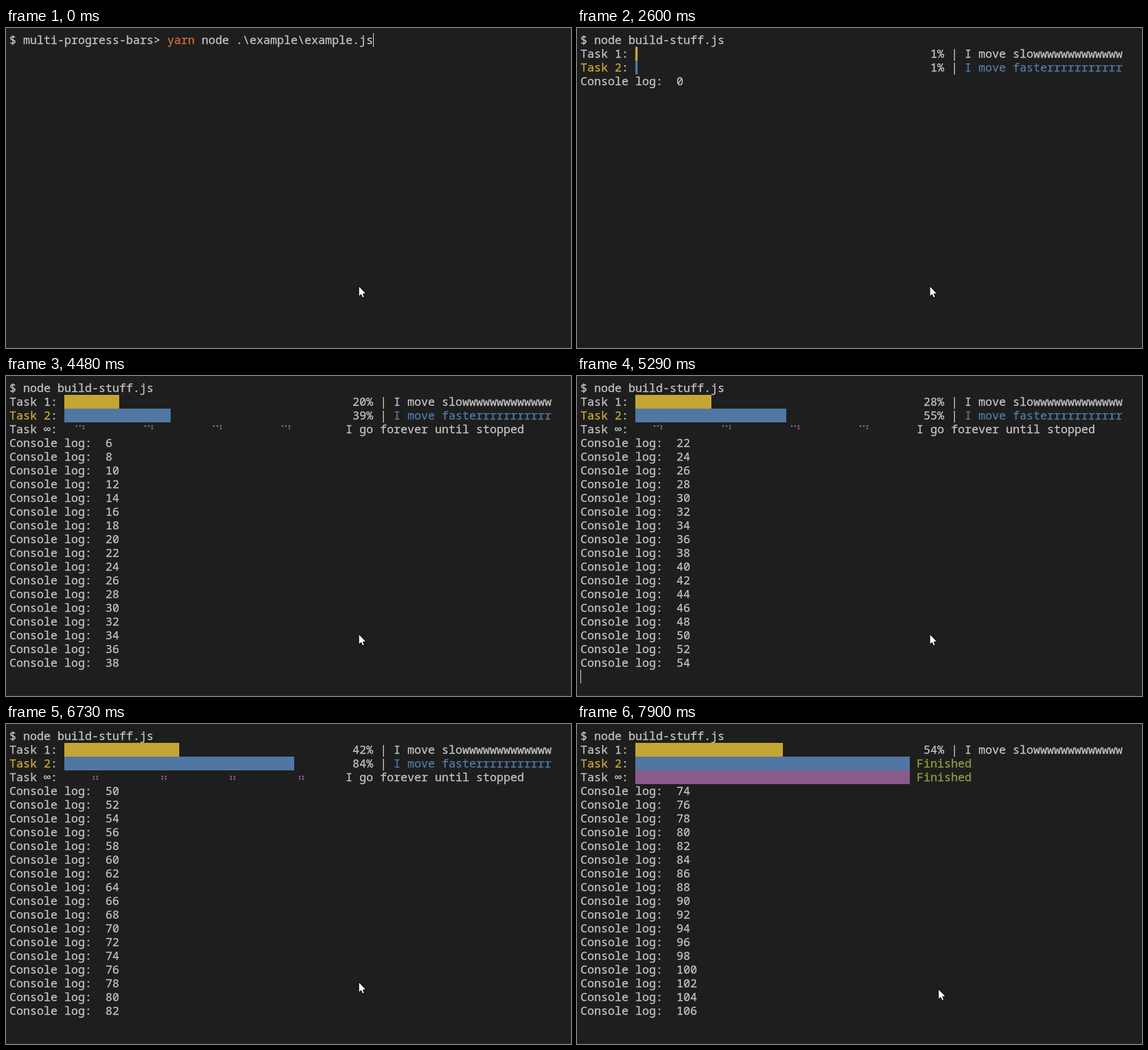
An HTML page with a canvas that plays this animation: 988x559 px, repeating every 7.99 s.

```html
<!DOCTYPE html>
<html lang="en">
<head>
<meta charset="utf-8">
<title>Progress bars in a terminal</title>
<style>
html, body { margin: 0; height: 100%; overflow: hidden; background: #1e1e1e; }
canvas { display: block; }
</style>
</head>
<body>
<canvas id="stage" width="988" height="559"></canvas>
<script>
const ctx = document.getElementById('stage').getContext('2d');
const LOOP = 7990, START = 2600, CELL = 12, LINE = 24, LEFT = 6, TOP = 9;
const BAR_COL = 8, BAR_CELLS = 40, INFO_COL = 49, MAX_LOGS = 17;
const GRAY = '#bfbfbf', YELLOW = '#c5a635', BLUE = '#5077a3',
      PURPLE = '#895b8d', GREEN = '#8b9b3f', ORANGE = '#c66f33';
const SPINNER = ['⠈⠙', '⠹', '⠛', '⠳', '⠶', '⣤', '⠶', '⠏'];
const BRAILLE = [[0, 0], [0, 1], [0, 2], [1, 0], [1, 1], [1, 2], [0, 3], [1, 3]];
const ARROW = [0, 0, 0, 16, 3.6, 12.8, 6.2, 18.5, 8.4, 17.5, 6, 12, 11, 11.5];

const colX = col => LEFT + col * CELL;
const rowY = row => TOP + row * LINE;

// A thin stroke gives the letters a slightly heavier weight.
function write(row, col, text, color = GRAY) {
  ctx.fillStyle = ctx.strokeStyle = color;
  ctx.lineWidth = 0.4;
  [...text].forEach((ch, i) => {
    ctx.fillText(ch, colX(col + i), rowY(row) + 19);
    ctx.strokeText(ch, colX(col + i), rowY(row) + 19);
  });
}

function bar(row, percent, color) {
  const eighths = Math.floor(percent * BAR_CELLS * 8 / 100);
  ctx.fillStyle = color;
  ctx.fillRect(colX(BAR_COL), rowY(row), Math.floor(eighths * CELL / 8), LINE);
}

function task(row, name, nameColor) {
  write(row, 0, name, nameColor);
  write(row, name.length, ':');
}

function running(row, percent, color, message, messageColor) {
  bar(row, percent, color);
  write(row, INFO_COL, String(percent).padStart(3) + '% |');
  write(row, 56, message, messageColor);
}

function finished(row, color) {
  bar(row, 100, color);
  write(row, INFO_COL, 'Finished', GREEN);
}

function spinner(row, tick) {
  const step = tick + 77;                     // 8 ticks per cell, 10 cells per cycle
  const cell = Math.floor(step / 8), shape = SPINNER[step % 8];
  ctx.fillStyle = PURPLE;
  [...shape].forEach((ch, i) => {
    const bits = ch.charCodeAt(0) & 255;
    for (let n = 0; n < 4; n++) {
      const pos = (cell + i + 1 - shape.length + n * 10) % BAR_CELLS;
      BRAILLE.forEach(([dx, dy], bit) => {
        if (bits >> bit & 1)
          ctx.fillRect(colX(BAR_COL + pos) + 2 + dx * 6, rowY(row) + 5 + dy * 4.3, 3, 2.8);
      });
    }
  });
}

function caret(row, col) {
  ctx.fillStyle = '#fff';
  ctx.fillRect(colX(col), rowY(row), 1, LINE);
}

function pointer(x, y) {
  ctx.beginPath();
  for (let i = 0; i < ARROW.length; i += 2) ctx.lineTo(x + ARROW[i], y + ARROW[i + 1]);
  ctx.closePath();
  ctx.fillStyle = '#fff';
  ctx.strokeStyle = '#000';
  ctx.lineWidth = 2;
  ctx.stroke();
  ctx.fill();
}

function prompt(t) {
  write(0, 0, '$ multi-progress-bars>');
  write(0, 23, 'yarn', ORANGE);
  write(0, 28, 'node .\\example\\example.js');
  if (t < 370 || t >= 840 && t < 1400) caret(0, 53);
  if (t >= 1680 && t < 2330) caret(1, 0);
}

function build(t) {
  const time = t - START;
  const tick = Math.floor((time + 25) / 100);
  const slow = Math.floor((time + 35) / 100) + 1;
  const fast = Math.floor((time + 25) / 50) + 1;
  const endless = time >= 90;

  write(0, 0, '$ node build-stuff.js');
  task(1, 'Task 1');
  running(1, slow, YELLOW, 'I move slo' + 'w'.repeat(13));
  task(2, 'Task 2', YELLOW);
  if (fast < 100) running(2, fast, BLUE, 'I move faste' + 'r'.repeat(11), BLUE);
  else finished(2, BLUE);
  if (endless) {
    task(3, 'Task ∞');
    if (t >= 7360) finished(3, PURPLE);
    else {
      spinner(3, tick);
      write(3, INFO_COL, 'I go forever until stopped');
    }
  }

  const first = Math.max(0, tick - MAX_LOGS + 1);
  let row = endless ? 4 : 3;
  for (let i = first; i <= tick; i++) write(row++, 0, 'Console log:  ' + i * 2);
  if (t >= 3410 && Math.floor((t - 2330) / 530) % 2) caret(row, 0);
}

// The screen refreshes every 90 ms, with one short refresh before 4120.
function refreshTime(t) {
  const base = t < 4120 ? START : 4120;
  return base + Math.floor((t - base) / 90) * 90;
}

function draw(now) {
  let t = now % LOOP;
  ctx.fillStyle = '#1e1e1e';
  ctx.fillRect(0, 0, 988, 559);
  ctx.fillStyle = '#282b2d';
  ctx.fillRect(0, 558, 988, 1);
  ctx.font = '20px "Noto Sans Mono", "DejaVu Sans Mono", monospace';
  ctx.lineJoin = 'round';
  if (t < START) prompt(t);
  else build(t = refreshTime(t));
  const move = (t - 7270) / 630;
  if (move < 0) pointer(617.5, 452);
  else pointer(615.5 + Math.round(17 * move), 450 + Math.round(14 * move));
  requestAnimationFrame(draw);
}
requestAnimationFrame(draw);
</script>
</body>
</html>
```
